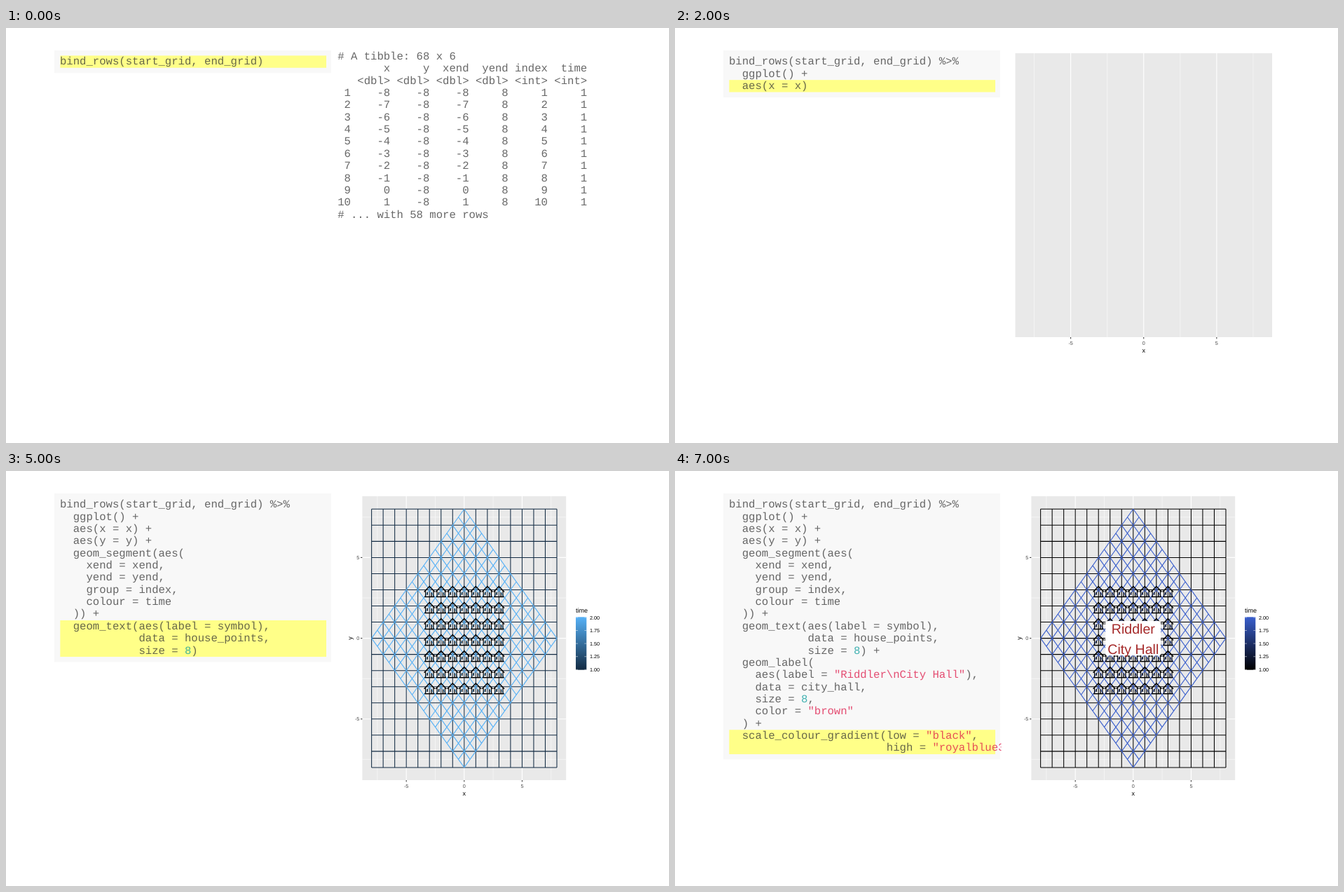
An HTML page for the animation above (8000 ms loop, 946 by 592 pixels).

```html
<!DOCTYPE html>
<html lang="en">
<head>
<meta charset="utf-8">
<style>
  html, body { margin: 0; width: 100%; height: 100%; overflow: hidden; background: #fff; }
  svg { display: block; }
  text { white-space: pre; text-rendering: geometricPrecision; }
  .mono { font: 15.62px "Liberation Mono", monospace; fill: #333; }
  .mono text { fill-opacity: .74; }
  .plot { font: 7.25px "Liberation Sans", Arial, sans-serif; }
  .string { fill: #dd1144; }
  .number { fill: #009999; }
</style>
</head>
<body>
<svg id="stage" width="946" height="592" viewBox="0 0 946 592"></svg>
<script>
const STEP_MS = 1000, LINE = 17.36, CODE_TOP = 39.4;
const TOP = 36, BOTTOM = 441;

const steps = [
  'bind_rows(start_grid, end_grid)',
  '  ggplot()',
  '  aes(x = x)',
  '  aes(y = y)',
  `  geom_segment(aes(
    xend = xend,
    yend = yend,
    group = index,
    colour = time
  ))`,
  `  geom_text(aes(label = symbol),
            data = house_points,
            size = 8)`,
  `  geom_label(
    aes(label = "Riddler\\nCity Hall"),
    data = city_hall,
    size = 8,
    color = "brown"
  )`,
  `  scale_colour_gradient(low = "black",
                        high = "royalblue3")`
].map(s => s.split('\n'));

const range = (from, to, by = 1) =>
  Array.from({ length: Math.round((to - from) / by) + 1 }, (_, i) => from + i * by);
const escapeText = s => s.replace(/&/g, '&amp;').replace(/</g, '&lt;');
const rect = (x1, y1, x2, y2, fill) =>
  `<rect x="${x1}" y="${y1}" width="${x2 - x1}" height="${y2 - y1}" fill="${fill}"/>`;
const text = (x, y, s, attrs = '') => `<text x="${x}" y="${y}" ${attrs}>${s}</text>`;
const strokes = (lines, color, width) =>
  `<path d="${lines.map(([a, b, c, d]) => `M${a} ${b}L${c} ${d}`).join('')}" fill="none" stroke="${color}" stroke-width="${width}"/>`;

function highlightSyntax(line) {
  return escapeText(line).split(/("[^"]*"|\b\d+\b)/).map((part, i) =>
    i % 2 ? `<tspan class="${part[0] === '"' ? 'string' : 'number'}">${part}</tspan>` : part).join('');
}

function code(step) {
  const lines = steps.slice(0, step + 1).flatMap((block, i) => {
    const link = i === step ? '' : i ? ' +' : ' %>%';
    return block.map((s, j) => j === block.length - 1 ? s + link : s);
  });
  const end = CODE_TOP + lines.length * LINE;
  const start = end - steps[step].length * LINE;
  return '<svg width="465.5" height="592" class="mono">' +
    rect(69, 32, 464, end + 7.5, '#f8f8f8') +
    rect(77.3, start, 457, end, '#ffff88') +
    lines.map((s, i) => text(77, CODE_TOP + 12.8 + i * LINE, highlightSyntax(s))).join('') +
    '</svg>';
}

function table() {
  const row = (n, cells) => String(n).padStart(2) + cells.map(c => String(c).padStart(6)).join('');
  const lines = [
    '# A tibble: 68 x 6',
    row('', ['x', 'y', 'xend', 'yend', 'index', 'time']),
    row('', ['<dbl>', '<dbl>', '<dbl>', '<dbl>', '<int>', '<int>']),
    ...range(1, 10).map(i => row(i, [i - 9, -8, i - 9, 8, i, 1])),
    '# ... with 58 more rows'
  ];
  return '<g class="mono">' +
    lines.map((s, i) => text(473.2, 44.9 + i * LINE, escapeText(s))).join('') + '</g>';
}

const py = y => 238.6 - y * 23.04;

function panel(left, right, px, hasY) {
  const mid = px(0);
  const vertical = x => [px(x), TOP, px(x), BOTTOM];
  const horizontal = y => [left, py(y), right, py(y)];
  const major = [-5, 0, 5], minor = [-7.5, -2.5, 2.5, 7.5];
  const grid = at => [...at.map(vertical), ...(hasY ? at.map(horizontal) : [])];
  let out = rect(left, TOP, right, BOTTOM, '#e9e9e9') +
    strokes(grid(minor), '#fff', 0.5) + strokes(grid(major), '#fff', 1.1) +
    strokes(major.map(x => [px(x), BOTTOM, px(x), BOTTOM + 2.4]), '#333', 1) +
    major.map(x => text(px(x), 451.8, x, 'text-anchor="middle" fill="#4d4d4d"')).join('') +
    text(mid, 463, 'x', 'text-anchor="middle" font-size="9"');
  if (hasY) {
    out += strokes(major.map(y => [left - 2.4, py(y), left, py(y)]), '#333', 1) +
      major.map(y => text(left - 4, py(y) + 2.6, y, 'text-anchor="end" fill="#4d4d4d"')).join('') +
      text(0, 0, 'y', `transform="translate(494 ${py(0)}) rotate(-90)" text-anchor="middle" font-size="9"`);
  }
  return out;
}

function legend(low, high) {
  const ticks = range(1, 2, 0.25), y = v => 283.3 - (v - 1) * 74.4;
  return `<linearGradient id="ramp" x1="0" y1="1" x2="0" y2="0">
    <stop stop-color="${low}"/><stop offset="1" stop-color="${high}"/></linearGradient>` +
    text(813, 202, 'time', 'font-size="9"') +
    rect(813, 208.3, 828.3, 283.7, 'url(#ramp)') +
    strokes(ticks.flatMap(v => [[813, y(v), 816, y(v)], [825.3, y(v), 828.3, y(v)]]), '#fff', 0.5) +
    ticks.map(v => text(833, y(v) + 2.6, v.toFixed(2))).join('');
}

// Square grid, plus the same grid turned by 45 degrees and shrunk to fit inside.
function segments(px, low, high) {
  const seg = (a, b, c, d) => [px(a), py(b), px(c), py(d)];
  const k = range(-8, 8);
  const square = k.flatMap(i => [seg(i, -8, i, 8), seg(-8, i, 8, i)]);
  const diamond = k.flatMap(i => {
    const p = (i + 8) / 2, q = (i - 8) / 2;
    return [seg(p, q, q, p), seg(q, -p, p, -q)];
  });
  return strokes(square, low, 1.05) + strokes(diamond, high, 1.1);
}

function houses(px) {
  const at = range(-3, 3);
  return `<defs><g id="house" fill="none" stroke="#000">
    <path d="M-7.6 1.2L0 -6.8L7.6 1.2" stroke-width="1.5"/>
    <path d="M-5.6 0V8M5.6 0V8" stroke-width="1.2"/>
    <path d="M-7.2 8.2H7.2" stroke-width="1.5"/>
    <path d="M-3 1.5V5.5M2.8 2V8" stroke-width="1.3"/></g></defs>` +
    at.flatMap(y => at.map(x => `<use href="#house" x="${px(x)}" y="${py(y) + 1.8}"/>`)).join('');
}

function cityHall(mid) {
  const label = (y, s) => text(mid, y, s, 'text-anchor="middle" font-size="19.6" fill="#a52a2a"');
  return `<rect x="614" y="214" width="79.3" height="49.3" rx="3" fill="#fff"/>` +
    label(232, 'Riddler') + label(260.8, 'City Hall');
}

function output(step) {
  if (step === 0) return table();
  if (step === 1) return rect(485.5, TOP, 852, 464, '#e9e9e9');
  const left = step === 2 ? 485.5 : 508.4, right = step < 4 ? 852 : 799.2;
  const px = x => (left + right) / 2 + x * (right - left) / 17.6;
  let out = panel(left, right, px, step > 2);
  if (step > 3) {
    const [low, high] = step < 7 ? ['#132b43', '#56b1f7'] : ['#000', '#3a5fcd'];
    out += segments(px, low, high) + legend(low, high);
  }
  if (step > 4) out += houses(px);
  if (step > 5) out += cityHall(px(0));
  return `<g class="plot">${out}</g>`;
}

const stage = document.getElementById('stage');
let shown = -1;
function draw() {
  const step = Math.floor(performance.now() / STEP_MS) % steps.length;
  if (step !== shown) {
    stage.innerHTML = code(step) + output(step);
    shown = step;
  }
  requestAnimationFrame(draw);
}
draw();
</script>
</body>
</html>
```
